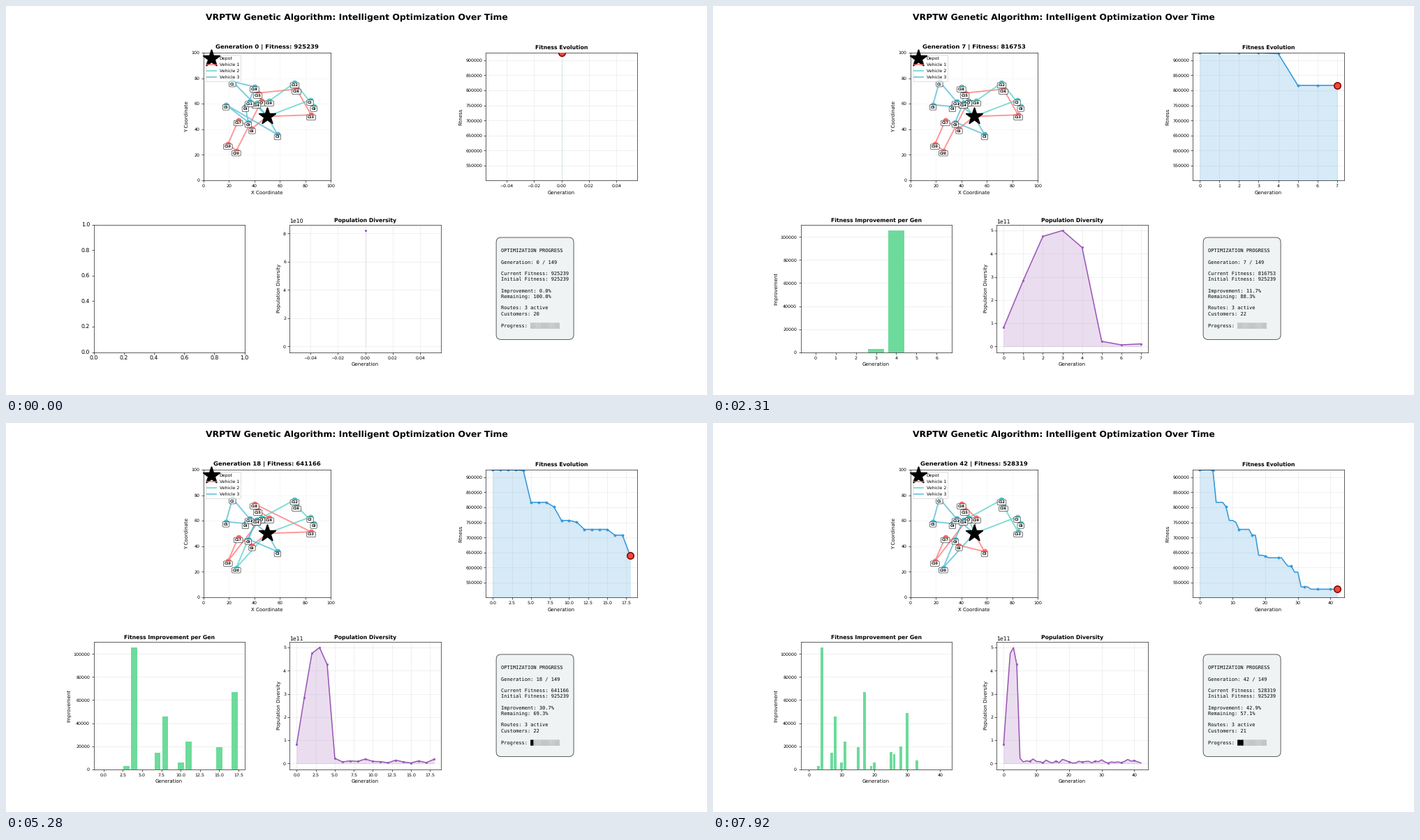
These frames come from a looping animation (1004 by 558 pixels, 8 s). A matplotlib script:

```python
import numpy as np
import matplotlib.pyplot as plt
from matplotlib.animation import FuncAnimation

W, H, DPI = 1004, 558, 55.8
STEP_MS, TICK_MS, LOOP_MS = 330, 80, 8000
LAST_GEN, SEEN_GENS = 149, 43
DEPOT = (50, 50)
COLORS = ["#FF6B6B", "#4ECDC4", "#45B7D1"]

plt.rcParams["font.family"] = "DejaVu Sans"
plt.rcParams["text.hinting"] = "none"

# One route per vehicle, then the edits each better generation makes
START = "13 16 15 7 20 10 17 6|2 8 12 19 14|1 18 11 4 9 5 3"
EDITS = {
    5: {"19 14": "19 7 18 14", "1 18 11 4 9 5 3": "11 1 5 4 14 9 3"},
    9: {"13 16": "13", "8 12": "8 16 12"},
    12: {"20 10": "10", "18 14": "18 14 20"},
    18: {"13 15": "13 18 15 19", "19 7 18 14": "7 14"},
    27: {"13 18 15 19": "19 15", "17 6": "17 6 3", "8 16": "8 13 16",
         "7 14 20": "18 7 14", "9 3": "9 20"},
    33: {"19 15": "19 18 15", "18 7 14": "7"},
}

# Best fitness, keyed by the generation where it dropped
DROPS = {
    0: 925239, 4: 922152, 5: 816753, 8: 802230, 9: 756733, 11: 751004,
    12: 726997, 16: 707850, 18: 641166, 20: 638420, 21: 632752,
    26: 617548, 27: 604752, 29: 584852, 31: 536052, 34: 528319,
}


def make_customers(count=20):
    """Scatter customers around the depot by random angle and radius."""
    draws = np.random.RandomState(42).rand(count, 6)
    angle, radius = 2 * np.pi * draws[:, 0], 10 + 30 * draws[:, 1]
    return np.column_stack([DEPOT[0] + radius * np.cos(angle),
                            DEPOT[1] + radius * np.sin(angle)])


def make_diversity():
    """An early burst that collapses into low noise."""
    noise = np.random.RandomState(7).gamma(3, 3e9, SEEN_GENS)
    burst = [8.2e10, 2.85e11, 4.75e11, 5e11, 4.27e11, 2.2e10]
    noise[:len(burst)] = burst
    return noise


def routes_at(gen):
    text = START
    for when, edits in EDITS.items():
        if when <= gen:
            for old, new in edits.items():
                text = text.replace(old, new)
    return [[int(c) for c in route.split()] for route in text.split("|")]


CUSTOMERS = make_customers()
DIVERSITY = make_diversity()
FITNESS = np.array([min(v for g, v in DROPS.items() if g <= gen)
                    for gen in range(SEEN_GENS)])

fig = plt.figure(figsize=((W + 1e-6) / DPI, (H + 1e-6) / DPI), dpi=DPI)
fig.suptitle("VRPTW Genetic Algorithm: Intelligent Optimization Over Time",
             fontsize=16, fontweight="bold", y=0.982)
grid = fig.add_gridspec(2, 3, hspace=0.35, wspace=0.3)
ax_map = fig.add_subplot(grid[0, :2])
ax_fit = fig.add_subplot(grid[0, 2])
ax_gain = fig.add_subplot(grid[1, 0])
ax_div = fig.add_subplot(grid[1, 1])
ax_info = fig.add_subplot(grid[1, 2])


def dress(ax, title, xlabel, ylabel, size=10, pad=6):
    ax.set_title(title, fontsize=size, fontweight="bold", pad=pad)
    ax.set_xlabel(xlabel, fontsize=9)
    ax.set_ylabel(ylabel, fontsize=9)
    ax.tick_params(labelsize=8)


def draw_map(gen, routes):
    ax = ax_map
    ax.scatter(*DEPOT, s=1000, c="black", marker="*", edgecolors="black",
               linewidths=2.5, zorder=10, label="Depot")
    for i, (route, color) in enumerate(zip(routes, COLORS), 1):
        stops = [CUSTOMERS[c - 1] for c in route]
        ax.plot(*zip(DEPOT, *stops, DEPOT), color=color, lw=2.5, alpha=0.7,
                label=f"Vehicle {i}")
        ax.scatter(*zip(*stops), s=80, c=color, zorder=3)
        for c, (x, y) in zip(route, stops):
            ax.text(x, y - 2, f"C{c}", fontsize=6, fontweight="bold",
                    ha="center", va="center", zorder=4,
                    bbox=dict(boxstyle="round,pad=0.3", facecolor="white",
                              edgecolor="black", lw=0.8, alpha=0.85))
    ax.set(xlim=(0, 100), ylim=(0, 100), aspect="equal")
    dress(ax, f"Generation {gen} | Fitness: {FITNESS[gen]}",
          "X Coordinate", "Y Coordinate", 11, pad=7)
    ax.grid(alpha=0.15)
    ax.legend(loc="upper left", fontsize=8)


def draw_history(ax, values, color, marker, size):
    gens = np.arange(len(values))
    ax.plot(gens, values, color=color, lw=2, marker=marker, markersize=size,
            markevery=max(1, len(values) // 10))
    ax.fill_between(gens, values, color=color, alpha=0.2)
    ax.grid(alpha=0.3)


def draw_fitness(gen):
    draw_history(ax_fit, FITNESS[:gen + 1], "#3498db", "o", 4)
    ax_fit.scatter(gen, FITNESS[gen], s=150, c="#e74c3c",
                   edgecolors="darkred", linewidths=2, zorder=5)
    ax_fit.set_ylim(FITNESS.min() * 0.95, FITNESS[0])
    dress(ax_fit, "Fitness Evolution", "Generation", "Fitness")


def draw_gain(gen):
    if gen == 0:
        return
    gains = -np.diff(FITNESS[:gen + 1])
    ax_gain.bar(np.arange(gen), gains, color="#2ecc71", alpha=0.7)
    ax_gain.grid(axis="y", alpha=0.3)
    dress(ax_gain, "Fitness Improvement per Gen", "Generation", "Improvement")


def draw_diversity(gen):
    draw_history(ax_div, DIVERSITY[:gen + 1], "#9b59b6", "s", 3)
    dress(ax_div, "Population Diversity", "Generation",
          "Population Diversity")


def draw_info(gen, routes):
    left = 100 * FITNESS[gen] / FITNESS[0]
    done = 10 * gen // LAST_GEN
    lines = [
        "", "OPTIMIZATION PROGRESS",
        "", f"Generation: {gen} / {LAST_GEN}",
        "", f"Current Fitness: {FITNESS[gen]}",
        f"Initial Fitness: {FITNESS[0]}",
        "", f"Improvement: {100 - left:.1f}%", f"Remaining: {left:.1f}%",
        "", f"Routes: {len(routes)} active",
        f"Customers: {sum(map(len, routes))}",
        "", "Progress: " + "█" * done + "░" * (10 - done), "",
    ]
    ax_info.axis("off")
    ax_info.text(0.1, 0.5, "\n".join(lines), fontsize=9, va="center",
                 family="DejaVu Sans Mono", linespacing=1.27,
                 transform=ax_info.transAxes,
                 bbox=dict(boxstyle="round,pad=1", facecolor="#ecf0f1",
                           alpha=0.8))


shown = None


def update(tick):
    global shown
    step = (tick * TICK_MS + TICK_MS - 1) // STEP_MS
    gen = max(step, 3 * (step - 10))  # skips ahead after generation 15
    if gen == shown:
        return
    shown = gen
    for ax in fig.axes:
        ax.clear()
    routes = routes_at(gen)
    draw_map(gen, routes)
    draw_fitness(gen)
    draw_gain(gen)
    draw_diversity(gen)
    draw_info(gen, routes)


anim = FuncAnimation(fig, update, frames=LOOP_MS // TICK_MS,
                     interval=TICK_MS, repeat=True, repeat_delay=0)
plt.show()
```
